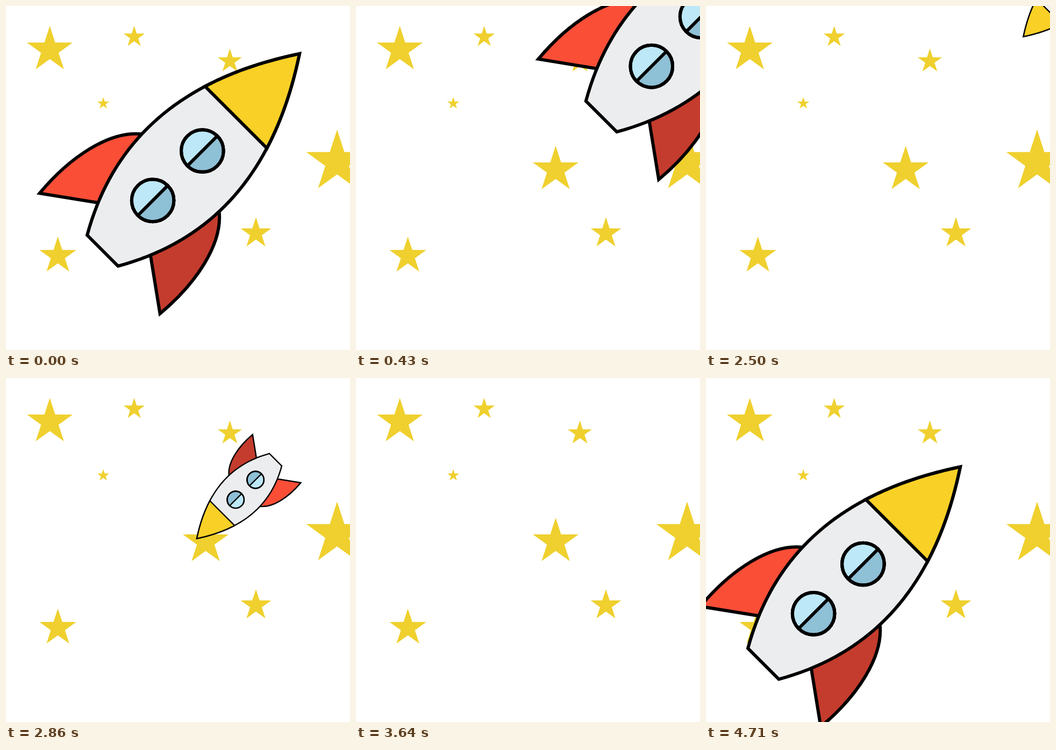
Recreate the animation shown at these times as an HTML page. Size 640x640 px, loop 4.78 s.

```html
<!DOCTYPE html>
<html lang="en">
<head>
<meta charset="utf-8">
<title>Rocket</title>
<style>
  html, body { margin: 0; width: 100%; height: 100%; overflow: hidden; background: #fff; }
  svg { display: block; width: 100%; height: 100%; }
</style>
</head>
<body>
<svg viewBox="0 0 640 640">
  <defs>
    <path id="fin" d="M-101 312.5C-149.6 351-166.2 439-158.4 525.4L-68 460.3Z"/>
    <g id="porthole">
      <circle r="39.3" fill="#bde8f7"/>
      <path d="M0-39.3A39.3 39.3 0 0 1 0 39.3Z" fill="#8ec0d6"/>
      <circle r="39.3" fill="none"/>
    </g>
  </defs>
  <path id="stars" fill="#efd02e"/>
  <!-- Upright rocket with its nose at 0,0 -->
  <g id="rocket" stroke="#000" stroke-width="6">
    <use href="#fin" fill="#fa4e37"/>
    <use href="#fin" fill="#c43c2d" transform="scale(-1 1)"/>
    <path id="body" fill="#ecedef"/>
    <path id="nose" fill="#f9d026"/>
    <use href="#porthole" y="255.5"/>
    <use href="#porthole" y="386"/>
  </g>
</svg>
<script>
const LOOP = 4780, STEPS = 67;
const HULL = 518, NOSE = 0.3225;

// Each star: centre x, top y, outer radius
const stars = [
  [81.5, 37, 44.7], [238.5, 37, 20.7], [416.5, 79, 23.7], [181, 169.5, 11.8],
  [371.5, 260, 44.7], [616, 230, 60.3], [465, 393, 30], [96.5, 429, 36]
];

// Straight flights of the nose; a negative scale flies backwards
const flights = [
  { first: 0, last: 10, from: [546, 88.9], to: [1026.5, -344.6], scale: 1, power: 1.08 },
  { first: 35, last: 50, from: [590.5, 57], to: [-116, 782], scale: -0.4, power: 1 },
  { first: 59, last: 66, from: [53, 606], to: [473, 165.4], scale: 1, power: 1 }
];

const $ = id => document.getElementById(id);
const polygon = points => `M${points.map(p => p.map(v => v.toFixed(2)).join(' ')).join('L')}Z`;

function star([cx, top, r]) {
  return polygon(Array.from({ length: 10 }, (_, i) => {
    const a = i * Math.PI / 5, d = i % 2 ? r * 0.382 : r;
    return [cx + d * Math.sin(a), top + r - d * Math.cos(a)];
  }));
}

// Outline of the hull from the nose down to a share of its length
function hull(end) {
  const side = Array.from({ length: 41 }, (_, i) => {
    const s = end * i / 40;
    return [s * (340.3 - 260.8 * s - 38.9 * s * s), HULL * s];
  });
  const mirror = side.slice(1).reverse().map(([x, y]) => [-x, y]);
  return polygon([...side, ...mirror]);
}

$('stars').setAttribute('d', stars.map(star).join(''));
$('body').setAttribute('d', hull(1));
$('nose').setAttribute('d', hull(NOSE));

function render(ms) {
  // The motion advances 14 times a second
  const step = Math.min(STEPS - 1, Math.floor((ms % LOOP + 4) * STEPS / LOOP));
  const flight = flights.find(f => step >= f.first && step <= f.last);
  $('rocket').style.display = flight ? '' : 'none';
  if (!flight) return;
  const { first, last, from, to, scale, power } = flight;
  const p = ((step - first) / (last - first)) ** power;
  const [x, y] = from.map((v, i) => v + (to[i] - v) * p);
  $('rocket').setAttribute('transform', `translate(${x} ${y}) rotate(45) scale(${scale})`);
}

const start = performance.now();
function tick() {
  render(performance.now() - start);
  requestAnimationFrame(tick);
}
render(0);
requestAnimationFrame(tick);
</script>
</body>
</html>
```
